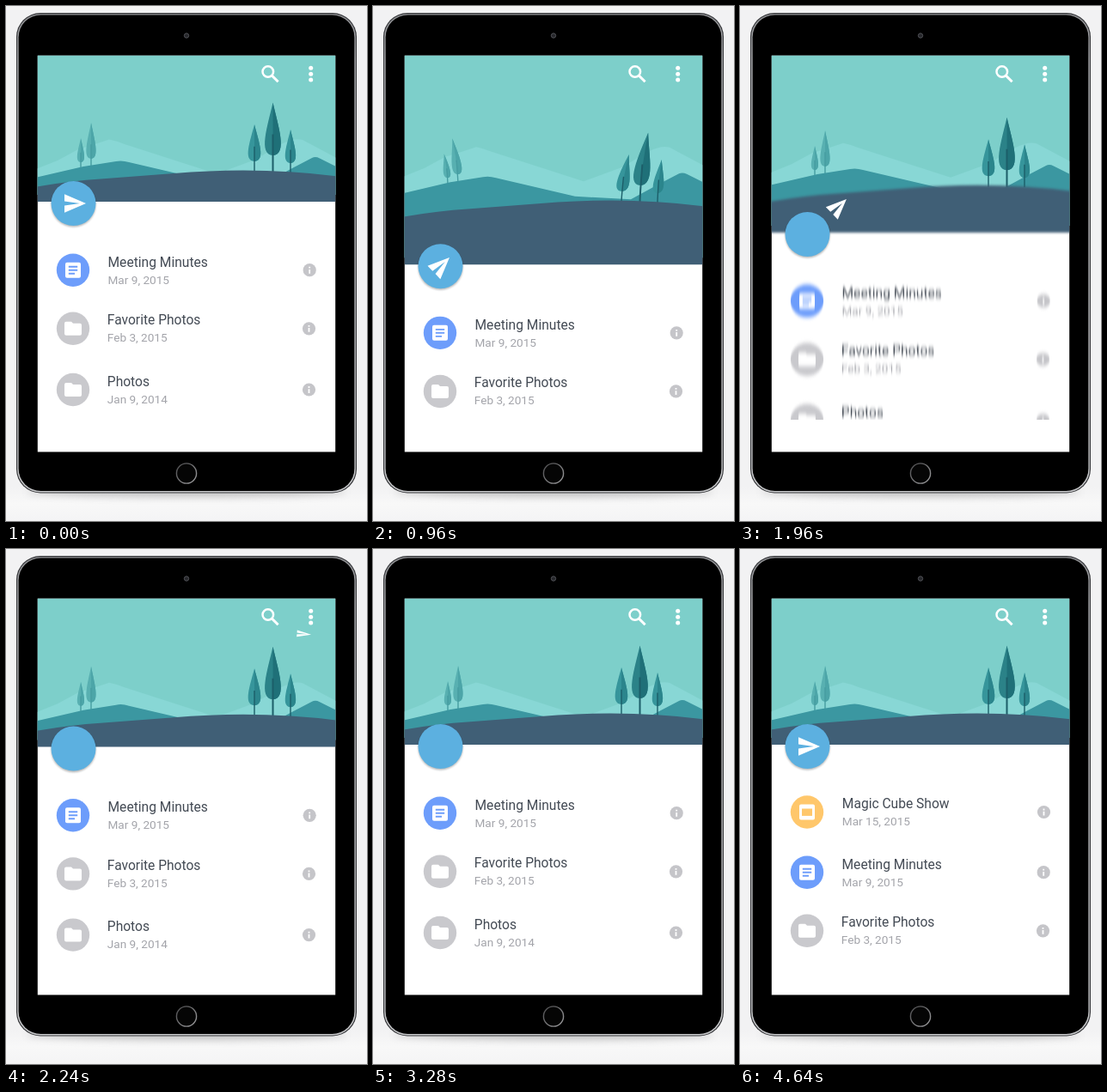
These frames come from a looping animation (420x600 px, 5400 ms). An HTML page:

```html
<!DOCTYPE html>
<html lang="en">
<head>
<meta charset="utf-8">
<title>Pull to refresh</title>
<style>
html, body { margin: 0; width: 100%; height: 100%; overflow: hidden; background: #f2f2f3; }
svg { display: block; width: 420px; height: 600px; }
text { font-family: Roboto, sans-serif; }
.title { font-size: 15.6px; fill: #434a54; }
.date { font-size: 13.6px; fill: #a3a4aa; }
</style>
</head>
<body>
<svg viewBox="0 0 420 600" xmlns="http://www.w3.org/2000/svg">
  <defs>
    <linearGradient id="floor" x1="0" y1="0" x2="0" y2="1">
      <stop offset="0" stop-color="#f2f2f3"/>
      <stop offset=".5" stop-color="#f8f8f8"/>
      <stop offset="1" stop-color="#f4f4f5"/>
    </linearGradient>
    <linearGradient id="rim" x1="0" y1="0" x2="0" y2="1">
      <stop offset="0" stop-color="#8e8f92"/>
      <stop offset=".1" stop-color="#b4b5b8"/>
      <stop offset="1" stop-color="#c8c9cb"/>
    </linearGradient>
    <linearGradient id="ring" x1="0" y1="0" x2="1" y2="1">
      <stop offset="0" stop-color="#4a4a4c"/>
      <stop offset="1" stop-color="#a2a2a4"/>
    </linearGradient>
    <clipPath id="screen"><rect x="36.8" y="57.7" width="346.4" height="461.8"/></clipPath>
    <clipPath id="listArea"><rect x="37" y="58" width="346" height="424"/></clipPath>
    <clipPath id="backdrop"><rect id="backdropRect" x="36" y="57" width="348" height="163"/></clipPath>
    <filter id="soft" x="-50%" y="-200%" width="200%" height="500%"><feGaussianBlur stdDeviation="4"/></filter>
    <filter id="shade" x="-20%" y="-20%" width="140%" height="140%"><feGaussianBlur stdDeviation="1.3"/></filter>
    <filter id="hillBlur" filterUnits="userSpaceOnUse" x="0" y="0" width="420" height="620" color-interpolation-filters="sRGB"><feGaussianBlur stdDeviation="0 0"/></filter>
    <filter id="listBlur" filterUnits="userSpaceOnUse" x="0" y="0" width="420" height="620" color-interpolation-filters="sRGB"><feGaussianBlur stdDeviation="0 0"/></filter>
    <path id="planeShape" d="M2 21L23 12 2 3V10L17 12 2 14Z" fill="#fff" transform="scale(1.19) translate(-10.8 -12)"/>
    <g id="info">
      <circle r="7.6" fill="#c5c5c9"/>
      <path d="M0-.8V4M0-3.9V-2.1" stroke="#fff" stroke-width="1.8"/>
    </g>
    <g id="folder">
      <circle r="19.2" fill="#c9c9cd"/>
      <path d="M-2-8H-8a2 2 0 0 0-2 2V6a2 2 0 0 0 2 2H8a2 2 0 0 0 2-2V-4a2 2 0 0 0-2-2H0Z" fill="#fff"/>
    </g>
    <g id="doc">
      <circle r="19.2" fill="#6d9dfb"/>
      <rect x="-9" y="-9" width="18" height="18" rx="2" fill="#fff"/>
      <path d="M-5.2-4H5.2M-5.2 0H5.2M-5.2 4H2" stroke="#6d9dfb" stroke-width="1.9"/>
    </g>
    <g id="slide">
      <circle r="19.2" fill="#ffc76b"/>
      <rect x="-9" y="-9" width="18" height="18" rx="2" fill="#fff"/>
      <rect x="-6" y="-4" width="12" height="8.4" fill="#ffc76b"/>
    </g>
  </defs>

  <rect width="420" height="600" fill="#f2f2f3"/>
  <rect y="560" width="420" height="40" fill="url(#floor)"/>
  <ellipse cx="210" cy="566" rx="186" ry="6" fill="#777" opacity=".4" filter="url(#soft)"/>
  <rect x="12" y="8" width="396" height="559.5" rx="28" fill="#37383b"/>
  <rect x="13.2" y="9.2" width="393.6" height="557.3" rx="27" fill="url(#rim)"/>
  <rect x="14.6" y="10.4" width="390.8" height="554.6" rx="26" fill="#000"/>
  <circle cx="210" cy="34.5" r="2.7" fill="#26272b" stroke="#505156" stroke-width="1"/>
  <circle cx="210" cy="544.5" r="11.6" fill="#050505" stroke="url(#ring)" stroke-width="1.4"/>

  <g clip-path="url(#screen)">
    <rect x="36" y="57" width="348" height="464" fill="#fff"/>
    <g clip-path="url(#backdrop)">
      <rect x="36" y="57" width="348" height="300" fill="#7dcfca"/>
      <path id="far" fill="#88d7d5" d="M30 192L60 180 84 167Q104 161 120 155.5Q128 157 138 161L245 195.5 290 179 320 161Q336 153 345 156L390 180V320H30Z"/>
      <g id="mid">
        <g id="farTrees"></g>
        <path fill="#3b97a1" d="M30 201L90 187 128 181Q135 179.5 143 182L235 203.5 300 207 333 189 356 177Q360 175 365 177.5L390 190V320H30Z"/>
      </g>
    </g>
    <g id="trees"></g>
    <path id="front" fill="#405f76" filter="url(#hillBlur)"/>
    <g fill="none" stroke="#fff">
      <circle cx="304.8" cy="76.5" r="6.3" stroke-width="2.5"/>
      <path d="M309.2 80.9L316.6 88.2" stroke-width="3"/>
    </g>
    <g fill="#fff">
      <circle cx="354.7" cy="72.3" r="2.5"/><circle cx="354.7" cy="79.2" r="2.5"/><circle cx="354.7" cy="86.1" r="2.5"/>
    </g>
    <g clip-path="url(#listArea)">
      <g filter="url(#listBlur)"><g id="list"></g></g>
      <g id="fresh"></g>
    </g>
    <g id="button">
      <circle cx="78.5" cy="231.6" r="26" fill="#000" opacity=".28" filter="url(#shade)"/>
      <circle cx="78.5" cy="230" r="26" fill="#5cb0e0"/>
    </g>
    <g id="plane"><use href="#planeShape"/></g>
  </g>
</svg>

<script>
const LOOP = 5400, STEP = 40, PULL = 76, SHIFT = 69;
const $ = id => document.getElementById(id);
const set = (el, name, value) => el.setAttribute(name, value);
const move = (el, x, y) => set(el, 'transform', `translate(${x} ${y})`);
const seg = (t, a, b) => Math.min(1, Math.max(0, (t - a) / (b - a)));

// Timing curve with end handles (x1, 0) and (x2, 1)
const curve = (x1, x2) => x => {
  let lo = 0, hi = 1;
  for (let i = 0; i < 24; i++) {
    const s = (lo + hi) / 2, r = 1 - s;
    if (3 * x1 * s * r * r + 3 * x2 * s * s * r + s * s * s < x) lo = s; else hi = s;
  }
  return lo * lo * (3 - 2 * lo);
};
const pullEase = curve(.6, .1), releaseEase = curve(.77, .25), rowEase = curve(.4, .2);

const cubic = (u, a, b, c, d) => {
  const r = 1 - u;
  return r * r * r * a + 3 * u * r * r * b + 3 * u * u * r * c + u * u * u * d;
};

// Trees: parent, x, tip, foliage bottom, root, half width, full bend, colours
const treeTable = [
  ['farTrees', 99, 136, 178, 190, 6, -7, '#58b0b1', '#4ca5a8'],
  ['farTrees', 87, 154, 182, 190, 4.4, -4.5, '#58b0b1', '#4ca5a8'],
  ['trees', 289, 138, 181, 194, 7.8, 9, '#36959b', '#2b858c'],
  ['trees', 331, 144, 183, 194, 6.6, 5, '#36959b', '#2b858c'],
  ['trees', 310.5, 112.5, 174, 194, 10, 10, '#2b8288', '#1f7078']
];

const makeTree = ([parent, x, tip, low, root, w, bend, light, dark]) => {
  const g = $(parent);
  const add = attrs => {
    const p = document.createElementNS('http://www.w3.org/2000/svg', 'path');
    for (const k in attrs) set(p, k, attrs[k]);
    return g.appendChild(p);
  };
  const leaf = add({ fill: light }), half = add({ fill: dark });
  const trunk = add({ fill: 'none', stroke: parent === 'trees' ? '#1c5e69' : '#459ca0', 'stroke-width': w > 8 ? 2 : 1.4 });
  const len = low - tip, belly = low - len * .02, chest = tip + len * .45;
  return amount => {
    const at = (dx, y) => `${x + dx + bend * amount * ((root - y) / (root - tip)) ** 2} ${y}`;
    const right = `M${at(0, tip)}C${at(w * .62, chest)} ${at(w * 1.75, belly)} ${at(0, low)}`;
    set(leaf, 'd', `${right}C${at(-w * 1.75, belly)} ${at(-w * .62, chest)} ${at(0, tip)}Z`);
    set(half, 'd', `${right}Q${at(0, tip + len * .55)} ${at(0, tip)}Z`);
    set(trunk, 'd', `M${at(0, root)}Q${at(0, (root + low) / 2)} ${at(0, tip + len * .6)}`);
  };
};
const trees = treeTable.map(makeTree);

const row = (icon, x, y, title, date, dy = 0) => `
  <g class="icon" transform="translate(78 ${y})"><use href="#${icon}"/></g>
  <g class="label">
    <text class="title" x="${x}" y="${y - 4 + dy}">${title}</text>
    <text class="date" x="${x}" y="${y + 16 + dy}">${date}</text>
    <use href="#info" x="${x + 234.7}" y="${y}"/>
  </g>`;
$('list').innerHTML =
  row('doc', 118.5, 307.7, 'Meeting Minutes', 'Mar 9, 2015') +
  row('folder', 117.8, 375.8, 'Favorite Photos', 'Feb 3, 2015', -.6) +
  row('folder', 117.8, 447, 'Photos', 'Jan 9, 2014', -.2);
$('fresh').innerHTML = row('slide', 118.8, 306.5, 'Magic Cube Show', 'Mar 15, 2015', -.6);
const freshIcon = $('fresh').querySelector('.icon');
const freshLabel = $('fresh').querySelector('.label');

const pulled = t => pullEase(seg(t, 320 - STEP / 4, 1190));
const offset = t => PULL * (pulled(t) - releaseEase(seg(t, 1446, 2446)));
const shift = t => SHIFT * rowEase(seg(t, 3820, 4220));

// Vertical motion blur that grows with speed
const blur = (id, pos, t, gain) => {
  const v = pos(t + 20) - pos(t - 20);
  const s = Math.min(3, v * v * .018) * gain;
  set($(id).firstElementChild, 'stdDeviation', `0 ${s < .08 ? 0 : s}`);
};

// x, y, angle, scale x, scale y, opacity
const planePose = t => {
  if (t <= 1840) return [78.5, 230 + offset(t), -45 * pulled(t) ** .7, 1, 1, 1];
  if (t < 2290) {
    const u = ((t - 1840) / 450) ** 1.55;
    return [cubic(u, 78.5, 170, 260, 420), cubic(u, 291, 128, 102, 92),
      -45 + 72 * u * u, 1 - .4 * u, (1 - .4 * u) * (1 - .65 * u * u), 1];
  }
  if (t > 2820 && t < 3270) {
    const u = seg(t, 2820, 3270);
    return [400 - 385 * u, 134 + 61 * u * u, -4 - 14 * u, -.55, .4, 1];
  }
  if (t > 3820) {
    const u = 1 - (1 - seg(t, 3820, 4220)) ** 3;
    return [57.5 + 21 * u, 230, 0, 1, 1, Math.min(1, u * 1.6)];
  }
  return [0, 0, 0, 1, 1, 0];
};

const draw = t => {
  const off = offset(t), base = 228 + off, hill = off * .48;
  set($('backdropRect'), 'height', 163 + off);
  move($('far'), 0, off * .12);
  move($('mid'), 0, off * .25);
  move($('trees'), 0, hill);
  set($('front'), 'd', `M30 ${211.5 + hill}Q75 ${203.5 + hill} 110 ${201.5 + hill}L215 ${193.5 + hill}Q305 ${187.5 + hill} 390 ${199 + hill}V${base}H30Z`);

  const bend = pulled(t) * (1 + Math.cos(Math.PI * seg(t, 1430, 1900))) / 2;
  trees.forEach(tree => tree(bend));

  move($('button'), 0, off);
  move($('list'), 0, off + shift(t));
  blur('hillBlur', offset, t, .5);
  blur('listBlur', s => offset(s) + shift(s), t, 1);

  const u = seg(t, 3980, 4640);
  const tilt = Math.PI / 2 * Math.exp(-3 * u) * (1 - u) * Math.cos(4 * Math.PI * u);
  set(freshIcon, 'transform', `translate(78 306.5) scale(1 ${Math.cos(tilt)})`);
  set(freshIcon, 'opacity', u > 0 ? 1 : 0);
  set(freshLabel, 'opacity', seg(t, 3980, 4320));

  const [x, y, angle, sx, sy, alpha] = planePose(t);
  set($('plane'), 'transform', `translate(${x} ${y}) rotate(${angle}) scale(${sx} ${sy})`);
  set($('plane'), 'opacity', alpha);
};

const start = performance.now();
const tick = () => {
  const t = Math.max(0, performance.now() - start) % LOOP;
  draw(Math.floor(t / STEP) * STEP);
  requestAnimationFrame(tick);
};
tick();
</script>
</body>
</html>
```
